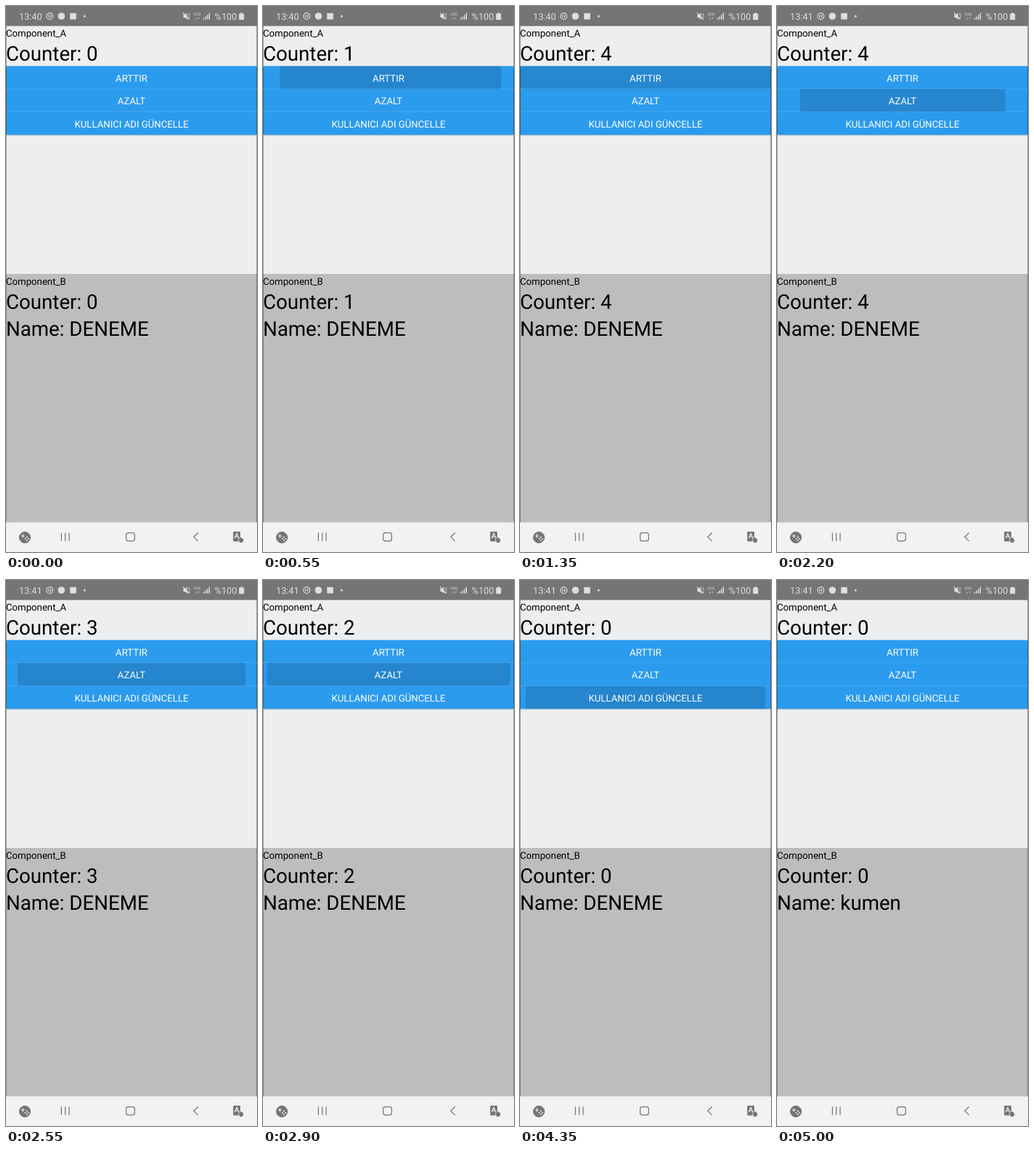
Recreate the animation shown at these times as an HTML page. Size 346 px wide and 750 px high, loop 7.05 s.

```html
<!DOCTYPE html>
<html lang="tr">
<head>
<meta charset="utf-8">
<style>
  html, body { margin: 0; width: 100%; height: 100%; overflow: hidden; }
  svg { display: block; width: 346px; height: 750px; font-family: Roboto, sans-serif; text-rendering: geometricPrecision; }
  .label { font-size: 13.2px; }
  .big { font-size: 27.7px; }
  .button { font-size: 13.2px; fill: #fff; text-anchor: middle; }
  .status { font-size: 12.7px; fill: #dedede; }
  .line { fill: none; stroke-width: 1.2; }
</style>
</head>
<body>
<svg viewBox="0 0 346 750">
  <rect width="346" height="750" fill="#eceef0"/>
  <rect y="368" width="346" height="341.5" fill="#bdbdbd"/>

  <g class="status">
    <rect width="346" height="27.5" fill="#757573"/>
    <text id="clock" x="18" y="18.6"></text>
    <circle class="line" cx="60.3" cy="14" r="4.4" stroke="#dedede"/>
    <path d="M59 12v4M61.6 12v4" class="line" stroke="#dedede"/>
    <circle cx="76.4" cy="14" r="4.8"/>
    <rect x="88.2" y="9.8" width="8.6" height="8.6"/>
    <circle cx="108.3" cy="14" r="1.5"/>
    <path d="M244.5 12h2l3-2.6v9.2l-3-2.6h-2z"/>
    <path d="M244 9.5l8.5 9M251.3 10.5l2 1.6M251.5 14h2M251.5 17.3l1.6-1" class="line" stroke="#dedede" stroke-width="1"/>
    <text x="258.3" y="13.2" font-size="5">4,5G</text>
    <path d="M260.5 18.2l1.4-2.5 1.4 2.5zM264.3 15.7h2.8l-1.4 2.5z" opacity=".6"/>
    <path d="M272.5 18.6v-2.2M275.1 18.6v-4.2M277.7 18.6v-6.4M280.3 18.6V9.6" stroke="#dedede" stroke-width="1.5"/>
    <text x="287.6" y="18.6">%100</text>
    <path d="M323.4 9.2h2.6v1.2h2.2v8.6h-7v-8.6h2.2z"/>
  </g>

  <text class="label" x="0" y="41.8">Component_A</text>
  <text class="big count" x="0" y="75"></text>
  <text class="label" x="0" y="382.8">Component_B</text>
  <text class="big count" x="0" y="416"></text>
  <text class="big" id="name" x="0" y="453"></text>

  <rect y="83" width="346" height="95" rx="2" fill="#000" opacity=".2"/>
  <g id="buttons"></g>
  <path d="M.5 27.5v682M345.5 27.5v682" stroke="#000" opacity=".3"/>

  <rect y="709.5" width="346" height="40.5" fill="#f2f2f2"/>
  <g fill="#747474" stroke="#747474">
    <circle cx="26" cy="730" r="7.6"/>
    <path d="M20.8 728h5M23.3 725.5v5" class="line" stroke="#f2f2f2" stroke-width="1.5"/>
    <g fill="#f2f2f2" stroke="none">
      <circle cx="28.8" cy="729.5" r="1"/><circle cx="31" cy="731.7" r="1"/>
      <circle cx="26.6" cy="731.7" r="1"/><circle cx="28.8" cy="733.9" r="1"/>
    </g>
    <path d="M76.4 723.5v11.5M81.7 723.5v11.5M87 723.5v11.5" class="line"/>
    <rect x="165.6" y="723.6" width="11.8" height="11.2" rx="3" class="line"/>
    <path d="M264.8 723.5l-6 5.8 6 5.8" class="line"/>
    <rect x="313.2" y="722" width="9.8" height="13.5" rx="1" stroke="none"/>
    <path d="M315.3 731l2.8-6.5 2.8 6.5M316.3 729h3.6" class="line" stroke="#f2f2f2"/>
    <path d="M320.2 732.6l3-3.4 4.2 2.8v3.2l-2 2.4h-3.4z" stroke="#f2f2f2" stroke-width=".8"/>
  </g>
</svg>
<script>
const LOOP = 7050, GROW = 225, FADE = 125, RELEASE = 170;
const buttons = [
  { text: 'ARTTIR', y: 82.5, drift: 9, presses: [170, 450, 780, 1110] },
  { text: 'AZALT', y: 114, drift: 0, presses: [2129, 2436, 2743, 3140] },
  { text: 'KULLANICI ADI GÜNCELLE', y: 145.5, drift: 0, presses: [4205] }
];
const clamp = v => Math.max(0, Math.min(1, v));
const byId = id => document.getElementById(id);
const counts = document.querySelectorAll('.count');

byId('buttons').innerHTML = buttons.map(({ text, y }, i) => `
  <clipPath id="clip${i}"><rect y="${y}" width="346" height="31.2" rx="1.7"/></clipPath>
  <rect y="${y}" width="346" height="31.5" rx="1.7" fill="#2b9bee"/>
  <path d="M1 ${y + 31.3}h344" stroke="#55aeec" stroke-width=".6"/>
  <circle class="ripple" cy="${y + 15.6}" clip-path="url(#clip${i})"/>
  <text class="button" x="173" y="${y + 21.2}">${text}</text>`).join('');
const ripples = document.querySelectorAll('.ripple');

function drawRipple(circle, { presses, drift }, time) {
  const age = time - (presses.findLast(p => p <= time) ?? -LOOP);
  const left = 1 - clamp(age / GROW);
  const grown = 1 - left * left;
  circle.setAttribute('r', 104 + 70 * grown);
  circle.setAttribute('cx', 173 + drift * (1 - grown));
  circle.setAttribute('opacity', 0.14 * clamp(age / 75) * (1 - clamp((age - GROW) / FADE)));
}

function draw(now) {
  const time = now % LOOP;
  const [added, removed, renamed] = buttons.map(b => b.presses.filter(p => p + RELEASE <= time).length);
  counts.forEach(el => el.textContent = `Counter: ${added - removed}`);
  byId('name').textContent = `Name: ${renamed ? 'kumen' : 'DENEME'}`;
  byId('clock').textContent = time < 1750 ? '13:40' : '13:41';
  buttons.forEach((button, i) => drawRipple(ripples[i], button, time));
}

const start = performance.now();
function tick() {
  draw(performance.now() - start);
  requestAnimationFrame(tick);
}
tick();
</script>
</body>
</html>
```
